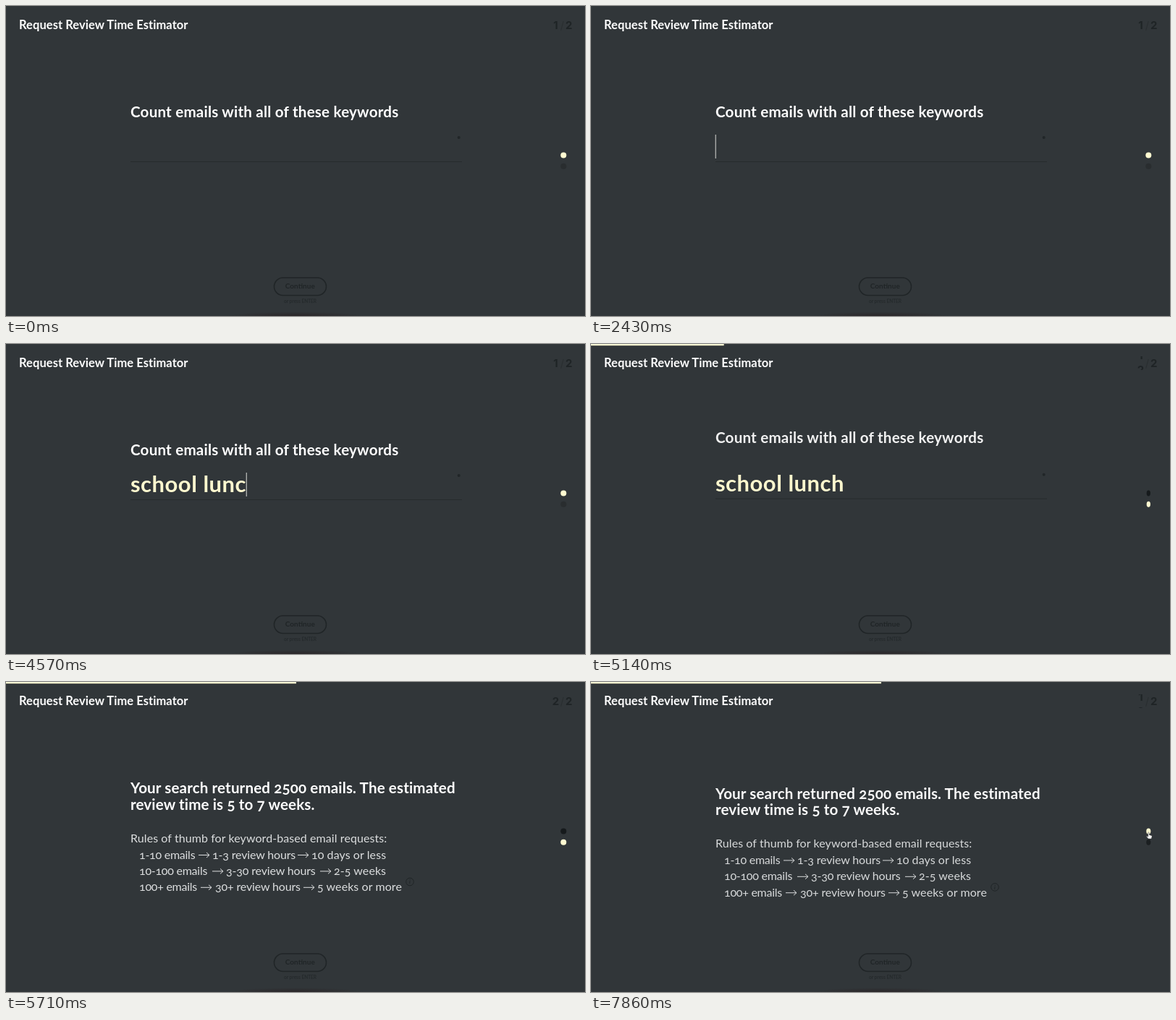
An HTML page for the animation above (8 s loop, 800 by 429 pixels).

```html
<!DOCTYPE html>
<html lang="en">
<head>
<meta charset="utf-8">
<title>Review Time Estimator</title>
<style>
  html, body { margin: 0; width: 100%; height: 100%; overflow: hidden; background: #313639; }
  svg { display: block; width: 100vw; height: 100vh; }
  text { font-family: Lato, sans-serif; font-variant-numeric: oldstyle-nums; white-space: pre; }
  .title { font-size: 16.5px; font-weight: 700; letter-spacing: .06px; fill: #fff; }
  .head { font-size: 20.6px; font-weight: 700; letter-spacing: .12px; fill: #fff; }
  .typed { font-size: 31px; font-weight: 700; letter-spacing: .5px; fill: #fff9cf; }
  .body { font-size: 16px; font-weight: 400; letter-spacing: .08px; fill: #dcdedf; }
  .num { font: 700 15px Inter, sans-serif; text-anchor: middle; fill: #1f2426; }
  .small { font-weight: 700; text-anchor: middle; fill: #202527; }
  .line { fill: none; stroke: #202527; }
</style>
</head>
<body>
<svg viewBox="0 0 800 429">
  <defs>
    <clipPath id="window"><rect x="750" y="17" width="18" height="19"/></clipPath>
    <radialGradient id="glow"><stop stop-color="#2b2628"/><stop offset="1" stop-color="#2b2628" stop-opacity="0"/></radialGradient>
  </defs>
  <rect width="800" height="429" fill="#313639"/>
  <ellipse cx="400" cy="429" rx="95" ry="6" fill="url(#glow)"/>

  <rect class="line" x="370.5" y="376" width="72" height="24.5" rx="12.2" stroke-width="1.6"/>
  <text class="small" x="406.3" y="391.4" font-size="10">Continue</text>
  <text class="small" x="406.5" y="411" font-size="6.5" opacity=".7">or press ENTER</text>

  <g id="question">
    <text id="prompt" class="head" x="172" y="154.3" style="letter-spacing:.2px">Count emails with all of these keywords</text>
    <g id="field">
      <text id="typed" class="typed" x="172" y="205"></text>
      <path d="M172 215.5H630" stroke="#272b2d"/>
      <circle cx="625.7" cy="182" r="2" fill="#212628"/>
      <rect id="caret" y="178" width="1" height="33" fill="#d9dad6"/>
    </g>
  </g>

  <g id="answer">
    <text class="head" x="172" y="154.3">Your search returned 2500 emails. The estimated</text>
    <text class="head" x="172" y="176.8">review time is 5 to 7 weeks.</text>
    <text class="body" x="172" y="222">Rules of thumb for keyword-based email requests:</text>
    <g id="rules"></g>
    <circle class="line" cx="558" cy="276.5" r="5.3"/>
    <text class="small" x="558" y="279.3" font-size="7.5" font-style="italic">i</text>
  </g>

  <text class="title" x="18" y="32">Request Review Time Estimator</text>
  <g clip-path="url(#window)">
    <g id="page">
      <text class="num" x="759.5" y="32">1</text>
      <text class="num" x="759.5" y="52">2</text>
    </g>
  </g>
  <text class="num" x="768.5" y="32" style="font-weight:400;fill:#2a2f31">/</text>
  <text class="num" x="777.7" y="32">2</text>
  <rect id="bar" height="2.2" fill="#fffad1"/>
  <ellipse id="dot1" cx="770.3" cy="206.4" ry="4"/>
  <ellipse id="dot2" cx="770.3" cy="221.8" ry="4"/>
  <g id="pointer" fill="#fff" stroke="#222" stroke-width=".5">
    <path id="arrow" d="M0 0V10L2.4 7.8 4 11.3 5.6 10.6 4 7.2H7.2Z"/>
    <path id="hand" d="M-.8 6V.5Q0-.8 .8 .5V3.5L4 4.5Q4.8 5 4.6 6L3.8 9H-.4L-3 6Q-2.5 4.6-.8 6Z"/>
  </g>
</svg>
<script>
const $ = id => document.getElementById(id);
const set = (id, attrs) => { for (const k in attrs) $(id).setAttribute(k, attrs[k]); };
const clamp = x => Math.min(1, Math.max(0, x));
const show = (id, on) => set(id, { visibility: on ? 'visible' : 'hidden' });

const LOOP = 8000, RATE = 7 / 1000;
const PHRASE = 'school lunch';
const KEY_TICKS = [21, 22, 23, 24, 24, 25, 26, 27, 28, 29, 32, 33];
const CREAM = '#fffad1', FORWARD = 5040, BACK = 7737;

const rules = [
  [[184, 285, 422], [266, 403], ['1-10 emails', '1-3 review hours', '10 days or less']],
  [[184, 304, 453], [285, 434], ['10-100 emails', '3-30 review hours', '2-5 weeks']],
  [[184, 289, 430], [269, 411], ['100+ emails', '30+ review hours', '5 weeks or more']]
];
const spacing = [-.25, -.15, .08];
$('rules').innerHTML = rules.map(([xs, arrows, words], row) => {
  const y = 244.5 + 22.4 * row;
  return words.map((w, i) => `<text class="body" x="${xs[i]}" y="${y}" style="letter-spacing:${spacing[i]}px">${w}</text>`).join('') +
    arrows.map(x => `<path d="M${x} ${y - 5}h15m-4-3.5l4 3.5-4 3.5" fill="none" stroke="#dcdedf"/>`).join('');
}).join('');

// Accelerating exit, in pixels
const leave = (t, start) => .00205 * Math.max(0, t - start) ** 2;
const fade = d => clamp(1 - d / 260);

function drawQuestion(tick, t) {
  show('question', t < 5700);
  const typed = PHRASE.slice(0, KEY_TICKS.filter(k => k <= tick).length);
  $('typed').textContent = typed;
  const width = typed ? $('typed').getComputedTextLength() : 0;
  set('caret', { x: 171.7 + width, opacity: tick < 36 && (typed || tick % 7 >= 3) ? 1 : 0 });
  const up = leave(t, 5052), fieldUp = leave(t, 5117);
  set('prompt', { transform: `translate(0 ${-up})`, opacity: fade(up) });
  set('field', { transform: `translate(0 ${-fieldUp})`, opacity: fade(fieldUp) });
}

function drawAnswer(t) {
  const p = clamp((t - 5350) / 340), down = leave(t, 7797);
  set('answer', {
    transform: `translate(0 ${206 * (1 - p) ** 3 + down})`,
    opacity: Math.min(clamp(p * 2.5), fade(down))
  });
}

function drawProgress(t) {
  const q = clamp((t - FORWARD) / 390);
  set('bar', { width: 401 * (1 - (1 - q) ** 2) });
  const turn = clamp((t - FORWARD) / 180), back = clamp((t - BACK) / 170);
  const page = turn - back, second = page > .5;
  set('page', { transform: `translate(0 ${-20 * page})` });
  const rx = 4 * (.6 + .4 * Math.abs(2 * page - 1));
  set('dot1', { rx, fill: second ? '#161a1c' : CREAM });
  set('dot2', { rx, fill: second ? CREAM : turn ? '#1b1f21' : '#292d2f' });
}

function drawPointer(tick) {
  show('pointer', tick >= 45);
  const p = clamp((tick - 44) / 5), near = clamp((tick - 50) / 3), over = tick >= 52;
  const curve = (a, b, c) => (1 - p) ** 2 * a + 2 * p * (1 - p) * b + p * p * c;
  const x = curve(129, 420, 758) + 12.5 * near, y = curve(425, 60, 214) - 6 * near;
  set('pointer', { transform: `translate(${x} ${y})` });
  set('arrow', { display: over ? 'none' : 'inline' });
  set('hand', { display: over ? 'inline' : 'none' });
}

function draw(now) {
  const tick = Math.floor((now % LOOP + 8) * RATE) % 56, t = tick / RATE;
  drawQuestion(tick, t);
  drawAnswer(t);
  drawProgress(t);
  drawPointer(tick);
}

let start;
function loop(now) {
  start ??= now;
  draw(now - start);
  requestAnimationFrame(loop);
}
draw(0);
requestAnimationFrame(loop);
</script>
</body>
</html>
```
